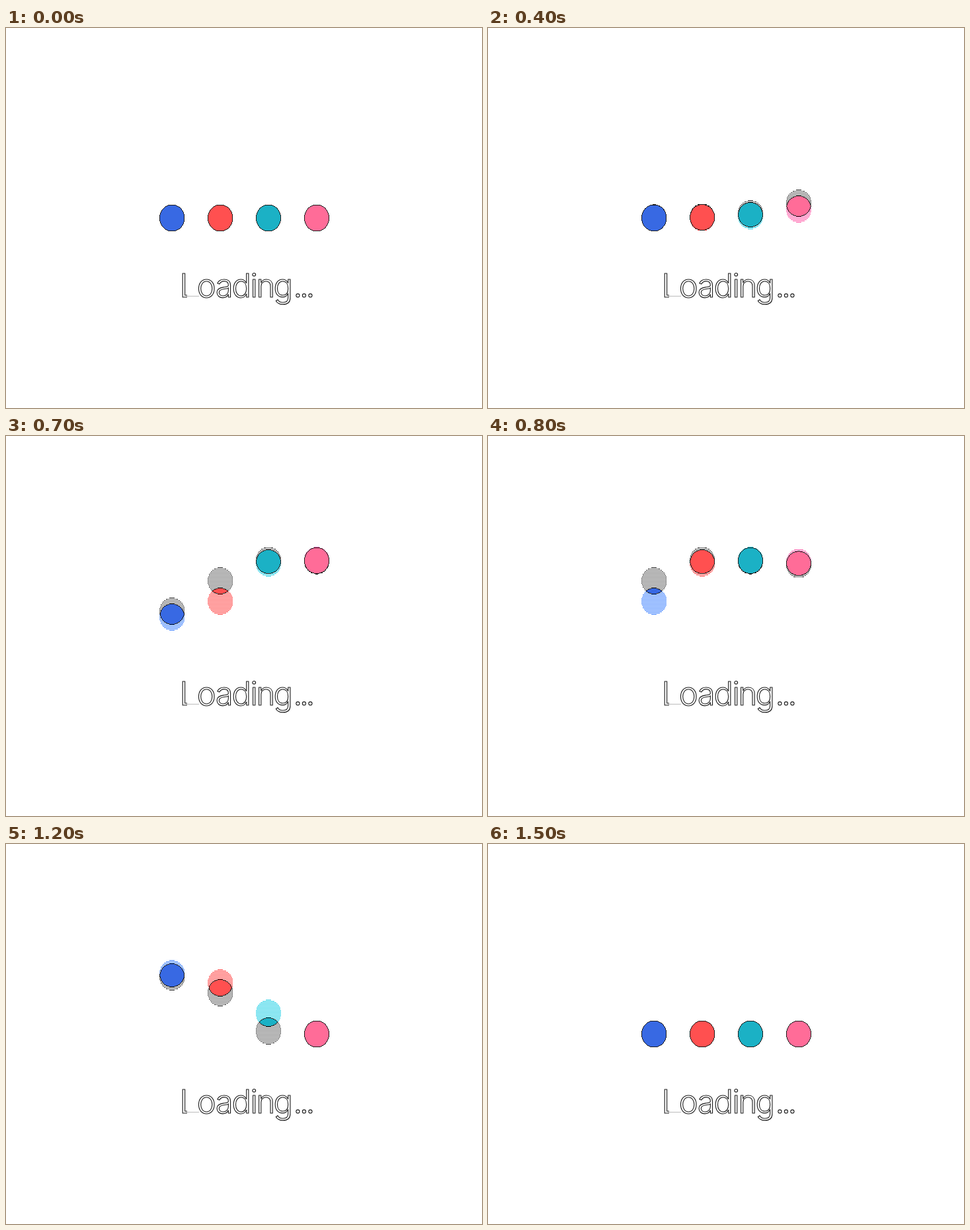
Animation of 720 by 576 pixels, one loop 2700 ms. Source, as an HTML page with a canvas:

```html
<!DOCTYPE html>
<html lang="en">
<head>
<meta charset="utf-8">
<title>Loading</title>
<style>
  html, body { margin: 0; width: 100%; height: 100%; overflow: hidden; background: #fff; }
  canvas, svg { position: absolute; left: 0; top: 0; width: 720px; height: 576px; display: block; }
  text {
    font: 300 49px Inter, "Liberation Sans", sans-serif;
    fill: #fff; stroke: #1c1c1c; stroke-width: 1.1px;
  }
</style>
</head>
<body>
<canvas id="stage" width="720" height="576"></canvas>
<svg viewBox="0 0 720 576">
  <text x="262.5" y="408">L</text>
  <rect x="274" y="400" width="19" height="10" fill="#fff"/>
  <path d="M272 406.5H292" stroke="#bbb"/>
  <text x="288.7 316.7 341.5 369.5 378.5 404.5 434.5 444 453.5" y="408">oading...</text>
</svg>
<script>
const ctx = document.getElementById('stage').getContext('2d');
const LOOP = 2700, STEP = 100, LAST = 15, FIELD = 40;
const RX = 19.2, RY = 20.5, INK = '#1c1c1c', GHOST = '#6c6c6c';

const balls = [
  { x: 251.2, delay: 300, fill: '#3869e3', trail: '#3c80ff' },
  { x: 324.2, delay: 200, fill: '#ff5050', trail: '#ff4040' },
  { x: 397,   delay: 100, fill: '#1bb1c5', trail: '#18cde4' },
  { x: 470,   delay: 0,   fill: '#ff6c98', trail: '#ff55a5' }
];

// One hop: [ms, centre y]
const hop = [
  [100, 288], [200, 287.5], [240, 286.5], [300, 284.5], [340, 281.5],
  [400, 274.5], [440, 265.5], [500, 250.5], [540, 219.5], [600, 192.5],
  [640, 188.5], [700, 188.5], [760, 189.5], [800, 191.5], [860, 196.5],
  [900, 201.5], [960, 210.5], [1000, 225.5], [1060, 256.5], [1100, 283.5],
  [1140, 288]
];

function height(t) {
  if (t <= hop[0][0]) return hop[0][1];
  for (let i = 1; i < hop.length; i++) {
    const [t0, y0] = hop[i - 1], [t1, y1] = hop[i];
    if (t <= t1) return y0 + (y1 - y0) * (t - t0) / (t1 - t0);
  }
  return hop[hop.length - 1][1];
}

// Times of the two interlaced fields around a step
function fields(t) {
  if (t < 1000) return [t, t + FIELD];
  return t < 1200 ? [t, t] : [t - FIELD, t];
}

const inside = (dx, dy) => (dx / RX) ** 2 + (dy / RY) ** 2 <= 1;

const onEdge = (test, x, y) =>
  !(test(x - 1, y) && test(x + 1, y) && test(x, y - 1) && test(x, y + 1));

function drawBall(ball, t) {
  const [yOld, yNew] = fields(t).map(f => height(f - ball.delay));
  const inOld = (x, y) => inside(x + 0.5 - ball.x, y + 0.5 - yOld);
  const inNew = (x, y) => inside(x + 0.5 - ball.x, y + 0.5 - yNew);
  const inBoth = (x, y) => inOld(x, y) && inNew(x, y);

  function colour(x, y) {
    if (inBoth(x, y)) return onEdge(inBoth, x, y) ? INK : ball.fill;
    const even = y % 2 === 0;
    const own = even ? inOld : inNew;
    if (!own(x, y)) return null;
    if (onEdge(own, x, y)) return even ? ball.trail : INK;
    return even ? ball.trail : GHOST;
  }

  const left = Math.floor(ball.x - RX) - 1, right = left + 42;
  const top = Math.floor(Math.min(yOld, yNew) - RY) - 1;
  const bottom = Math.ceil(Math.max(yOld, yNew) + RY) + 1;
  for (let y = top; y <= bottom; y++) {
    let start = left, paint = null;
    for (let x = left; x <= right; x++) {
      const next = x < right ? colour(x, y) : null;
      if (next === paint) continue;
      if (paint) {
        ctx.fillStyle = paint;
        ctx.fillRect(start, y, x - start, 1);
      }
      start = x;
      paint = next;
    }
  }
}

let shown = -1;
function draw(now) {
  const step = Math.min(LAST, Math.floor((now % LOOP) / STEP));
  if (step !== shown) {
    shown = step;
    ctx.clearRect(0, 0, 720, 576);
    balls.forEach(ball => drawBall(ball, step * STEP));
  }
}

const begin = performance.now();
function tick() {
  draw(performance.now() - begin);
  requestAnimationFrame(tick);
}
tick();
</script>
</body>
</html>
```
